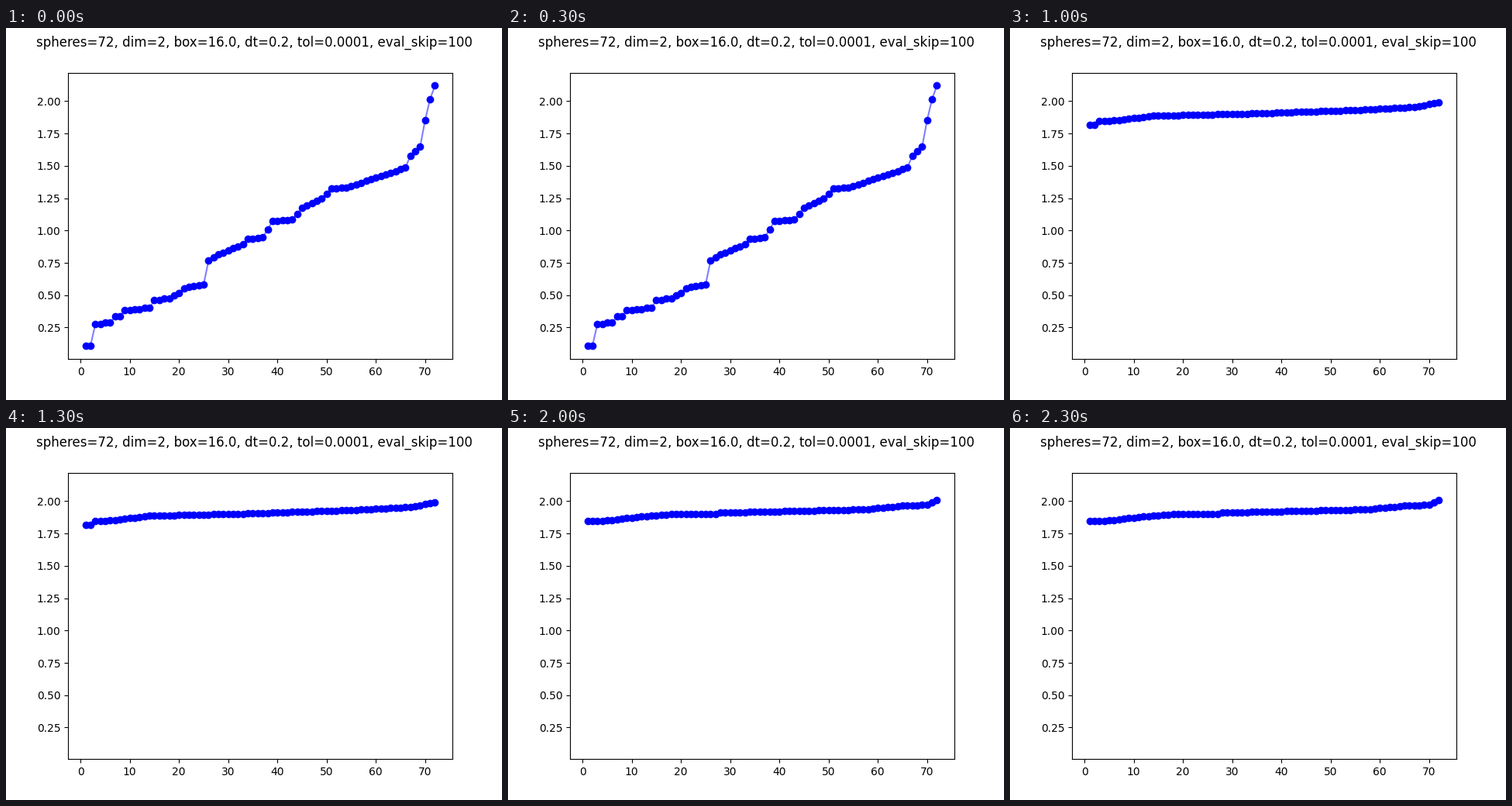
Animation, 640 px wide and 480 px high, one loop 2500 ms. Source, as a matplotlib script:

```python
import matplotlib.pyplot as plt
import numpy as np
from matplotlib.animation import FuncAnimation

COUNT = 72
PAIRED = 18  # the closest spheres share their distance in twos
x = np.arange(1, COUNT + 1)


def ramp(ranks, *knots):
    """Sorted distances, straight between (rank, distance) key points."""
    return np.interp(ranks, *zip(*knots))


pairs = np.where(x <= PAIRED, x - (x - 1) % 2, x)
loose = ramp(
    pairs, (1, 0.1065), (3, 0.275), (5, 0.287), (9, 0.383), (13, 0.402),
    (15, 0.46), (17, 0.472), (20, 0.515), (21, 0.555), (25, 0.582),
    (26, 0.766), (28, 0.815), (33, 0.893), (34, 0.935), (37, 0.946),
    (39, 1.072), (43, 1.085), (45, 1.175), (49, 1.245), (51, 1.324),
    (54, 1.331), (66, 1.486), (67, 1.577), (69, 1.65), (70, 1.852),
    (71, 2.015), (72, 2.1202))

settled = [
    ramp(x, (2, 1.821), (5, 1.85), (28, 1.882), (30, 1.893), (55, 1.925),
         (72, 1.966)),
    ramp(x, (2, 1.815), (3, 1.844), (7, 1.853), (14, 1.888), (31, 1.901),
         (55, 1.931), (67, 1.955), (72, 1.99)),
    ramp(x, (4, 1.839), (5, 1.855), (9, 1.865), (10, 1.88), (12, 1.886),
         (26, 1.895), (45, 1.929), (58, 1.937), (66, 1.961), (72, 1.997)),
    ramp(x, (1, 1.845), (6, 1.852), (9, 1.87), (18, 1.9), (27, 1.902),
         (28, 1.911), (57, 1.936), (65, 1.964), (70, 1.973), (72, 2.008)),
]
stages = [loose, *settled]

fig, ax = plt.subplots(figsize=(6.4, 4.8), dpi=100)
fig.suptitle("spheres=72, dim=2, box=16.0, dt=0.2, tol=0.0001, eval_skip=100")
line, = ax.plot(x, loose, "b-", alpha=0.5)
dots, = ax.plot(x, loose, "bo")
# keep the limits of the first stage
ax.set_xlim(ax.get_xlim())
ax.set_ylim(ax.get_ylim())


def update(i):
    line.set_ydata(stages[i])
    dots.set_ydata(stages[i])
    return line, dots


anim = FuncAnimation(fig, update, frames=len(stages), interval=500,
                     repeat=True, repeat_delay=0)
plt.show()
```
